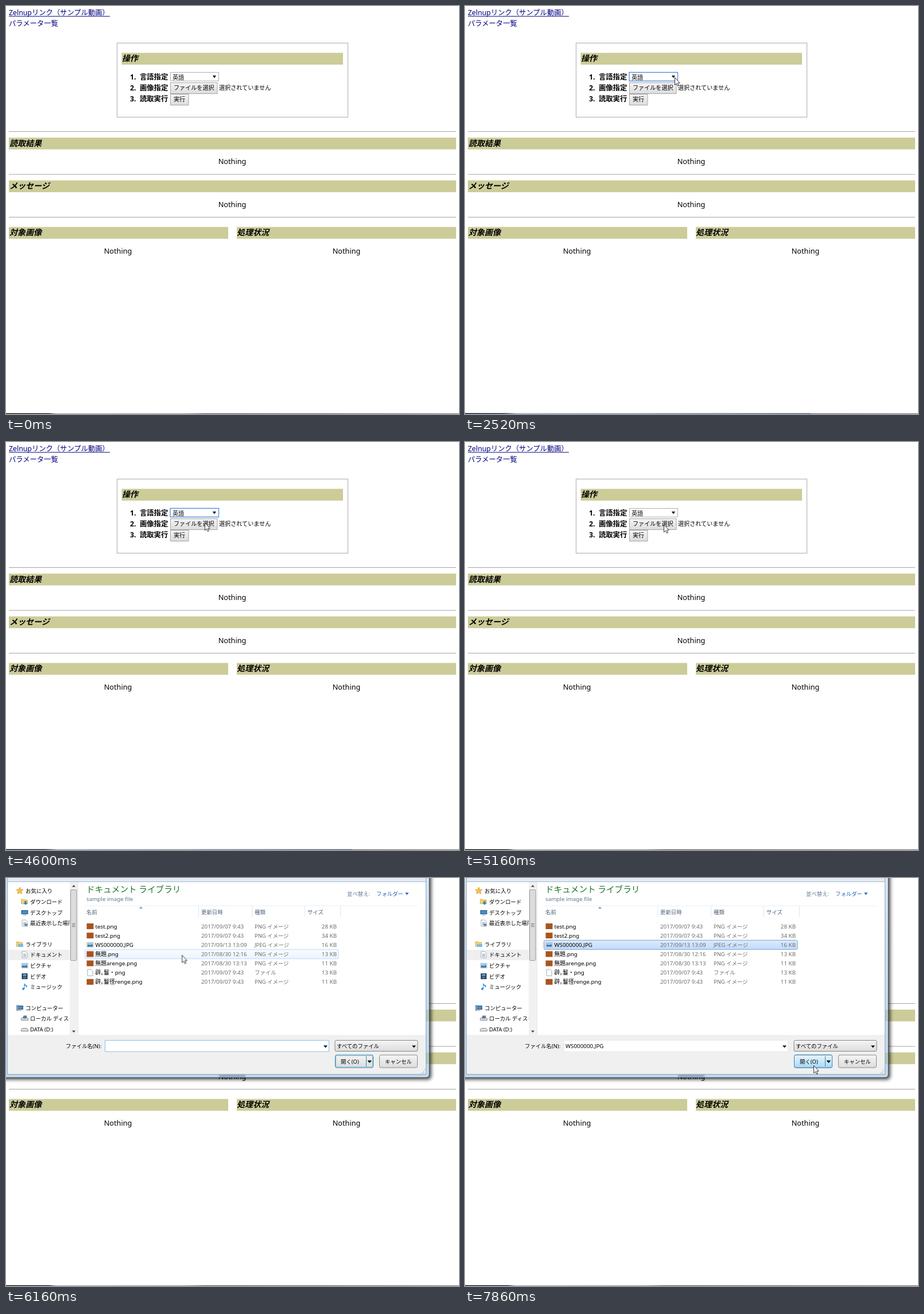
Write an HTML page that moves like this. It is 789x710 px and loops after 8 s.

```html
<!DOCTYPE html>
<html lang="ja">
<head>
<meta charset="utf-8">
<title>画像読取</title>
<style>
html, body { margin: 0; width: 100%; height: 100%; overflow: hidden; background: #fff; }
svg { display: block; width: 789px; height: 710px; }
text { font: 12.3px "Noto Sans", "Noto Sans CJK JP", sans-serif; white-space: pre; }
.nothing { font-size: 12.7px; text-anchor: middle; }
.head { font-size: 14px; font-weight: 700; font-style: italic; }
.step { font-weight: 700; }
.link { fill: #000080; }
.form { font-size: 10.1px; }
.bar { fill: #cc9; }
.rule { fill: #a3a3a3; }
.button { fill: url(#button); stroke: #a6a6a6; }
.ui text { font-size: 9.4px; }
.ui .title { font-size: 14.6px; fill: #1d7326; }
.ui .latin { font-size: 9.8px; }
.ui .soft { fill: #6d6d6d; }
.ui .label { fill: #4c607a; }
.ui .end { text-anchor: end; }

/* Everything shares one 8 s clock. */
.t { animation: 8s step-end infinite; }
.move { animation-name: move; animation-timing-function: linear; }
.hovered { animation-name: hovered; }
.focused { animation-name: focused; }
.list { animation-name: list; }
.tint { animation-name: focused; }
.dialog { animation-name: dialog; }
.caret { animation-name: caret; }
.row-hover { animation-name: row-hover; }
.picked { animation-name: picked; }
.field { animation-name: field; }
.open-hover { animation-name: open-hover; }

@keyframes move {
  0% { transform: translate(741px, 126px); opacity: 0; animation-timing-function: step-end; }
  12% { transform: translate(741px, 126px); opacity: 1; }
  16% { transform: translate(565px, 117px); }
  20.625% { transform: translate(421px, 112px); }
  21.75%, 22% { transform: translate(402px, 112px); }
  27.75%, 41.5% { transform: translate(365px, 124px); }
  46%, 56% { transform: translate(346px, 136px); }
  58.625%, 74.2% { transform: translate(346px, 143.5px); }
  82.75%, 90.8% { transform: translate(225px, 114px); animation-timing-function: ease-in-out; }
  98.25%, 100% { transform: translate(607px, 326px); opacity: 1; }
}
@keyframes hovered { 0% { opacity: 0; } 27% { opacity: 1; } 31.5%, 100% { opacity: 0; } }
@keyframes focused { 0% { opacity: 0; } 31.5% { opacity: 1; } 62.375%, 100% { opacity: 0; } }
@keyframes list { 0% { opacity: 0; } 32.5% { opacity: 1; } 51.75%, 100% { opacity: 0; } }
@keyframes dialog { 0% { opacity: 0; } 66.375%, 100% { opacity: 1; } }
@keyframes caret { 0% { opacity: 1; } 71.25% { opacity: 0; } 77.9% { opacity: 1; } 84.625%, 100% { opacity: 0; } }
@keyframes row-hover {
  0% { transform: translateY(64.5px); opacity: 1; }
  76% { transform: translateY(48.4px); }
  80% { transform: translateY(32.3px); }
  84.625% { opacity: 0; }
  92.9% { transform: translateY(48.4px); opacity: 1; }
  93.8% { transform: translateY(80.6px); opacity: 1; }
  94.6%, 100% { transform: translateY(80.6px); opacity: 0; }
}
@keyframes picked { 0% { opacity: 0; } 84.625%, 100% { opacity: 1; } }
@keyframes field { 0% { stroke: #8fbfe6; } 86.5%, 100% { stroke: #e6eaee; } }
@keyframes open-hover { 0% { opacity: 0; } 97.5%, 100% { opacity: 1; } }
</style>
</head>
<body>
<svg viewBox="0 0 789 710">
  <defs>
    <linearGradient id="button" x2="0" y2="1"><stop stop-color="#f5f5f5"/><stop offset="1" stop-color="#dcdcdc"/></linearGradient>
    <linearGradient id="hover" x2="0" y2="1"><stop stop-color="#fafcff"/><stop offset="1" stop-color="#ecf4fd"/></linearGradient>
    <linearGradient id="picked" x2="0" y2="1"><stop stop-color="#dcebfc"/><stop offset="1" stop-color="#c1dbfc"/></linearGradient>
    <linearGradient id="openHover" x2="0" y2="1"><stop stop-color="#e8f5fc"/><stop offset=".5" stop-color="#c9e8fa"/><stop offset="1" stop-color="#a5d8f3"/></linearGradient>
    <linearGradient id="glass" x2="0" y2="1"><stop stop-color="#d9e6f4"/><stop offset=".3" stop-color="#cbdff2"/><stop offset="1" stop-color="#bdd5ec"/></linearGradient>
    <linearGradient id="strip"><stop stop-color="#000"/><stop offset=".095" stop-color="#111"/><stop offset=".11" stop-color="#aaa"/><stop offset=".4" stop-color="#999"/><stop offset=".44" stop-color="#646068"/><stop offset="1" stop-color="#8a868c"/></linearGradient>
    <linearGradient id="stripTint"><stop stop-color="#0b1626"/><stop offset=".11" stop-color="#18263a"/><stop offset=".15" stop-color="#9ab"/><stop offset=".5" stop-color="#8894a2"/><stop offset="1" stop-color="#536170"/></linearGradient>
    <clipPath id="side"><path d="M3 7h108v266H3z"/></clipPath>
    <filter id="soft"><feGaussianBlur stdDeviation="1.5"/></filter>
  </defs>

  <text class="link" x="5" y="16.4">Zelnupリンク（サンプル動画）</text>
  <path class="link" d="M5 17.5h176v1H5z"/>
  <text class="link" x="5" y="34.6">パラメータ一覧</text>

  <path d="M193.5 64.5h402v129h-402z" fill="none" stroke="#c2c2c2" stroke-width="1.5"/>
  <path class="bar" d="M201.500 81.500H587V102H201.500zM5 229h779v20.500H5zM5 303.500h779V324H5zM5 384.500h382V405H5zM402 384.500h382V405H402z"/>
  <path class="rule" d="M5 218h779v1H5zM5 292.500h779v1H5zM5 367h779v1H5z"/>
  <g id="page"></g>

  <path d="M286.500 115.500h84v15h-84z" fill="#fff" stroke="#b0b0b0"/>
  <path class="t hovered" d="M286.500 115.500h84v15h-84z" fill="#f8f8f8" stroke="#8c8c8c"/>
  <path class="t focused" d="M286 115.500h84.500v15H286z" fill="#fff" stroke="#5b93dd" stroke-width="1.4"/>
  <text class="form" x="290" y="127.600">英語</text>
  <path d="M360 121h6l-3 4.500z"/>
  <rect class="button" x="286.500" y="133.500" width="81.500" height="19"/>
  <text class="form" x="292" y="146.300">ファイルを選択</text>
  <text class="form" x="371" y="146.300">選択されていません</text>
  <rect class="button" x="286.500" y="153.500" width="31.500" height="19"/>
  <text class="form" x="292" y="166.300">実行</text>

  <g class="t list">
    <path d="M286.500 131.500h84v32.500h-84z" fill="#fff" stroke="#8bb4e8"/>
    <path d="M287 131.500h83V148h-83z" fill="#1e90ff"/>
    <text class="form" x="290" y="143.200" fill="#fff">英語</text>
    <text class="form" x="290" y="159.200">日本語(精度悪)</text>
  </g>

  <path d="M0 708.800h789V710H0z" fill="url(#strip)"/>
  <path class="t tint" d="M0 708.800h602V710H0z" fill="url(#stripTint)"/>

  <g class="t dialog ui">
    <path d="M-9-9H737V342q0 5-5 5H-9z" fill="url(#glass)" stroke="#34485c" style="filter:drop-shadow(3px 3px 3px rgba(0,0,0,.75))"/>
    <path d="M736 0V341q0 5-5 5H0" fill="none" stroke="#eaf4fd" stroke-opacity=".8"/>
    <path d="M732 229h4v20h-4zM732 304h4v20h-4z" fill="#9fb39a" opacity=".5"/>
    <path d="M371 343h46v3h-46z" fill="#54708c" opacity=".7" filter="url(#soft)"/>
    <path d="M2.500-1H731.500V341.500H2.500z" fill="#fff" stroke="#93a9bf"/>
    <path d="M3 0H731V6H3z" fill="#e1ebf6"/>
    <path d="M3 6H731v1H3z" fill="#a5b8cd"/>
    <path d="M3 273H731v68H3z" fill="#f0f0f0"/>
    <path d="M3 125h108v18H3z" fill="#efefef"/>
    <path d="M111 7h14v266h-14z" fill="#f1f1f1"/>
    <rect x="112.500" y="20.500" width="10.500" height="123" rx="1.500" fill="#dcdcdc" stroke="#999"/>
    <path d="M115 15.500h6l-3-3.500zM115 265.500h6l-3 3.500z" fill="#444"/>
    <path d="M115 79.500h5.500M115 82h5.500M115 84.500h5.500" stroke="#777"/>
    <path d="M125.500 7v266" stroke="#e3e9f0"/>
    <g id="places" clip-path="url(#side)"></g>

    <text class="title" x="140" y="25">ドキュメント ライブラリ</text>
    <text class="latin" x="140" y="40" fill="#62758a">sample image file</text>
    <text x="594" y="30.500" fill="#657d96">並べ替え:</text>
    <text x="645" y="30.500" fill="#2763b8">フォルダー</text>
    <path d="M695 25.500h6.500l-3.250 4z" fill="#2763b8"/>
    <path d="M137 48.500H717" stroke="#e9eff5"/>
    <path d="M335.500 49v19M428.500 49v19M520.500 49v19M582.500 49v19" stroke="#dee7f0"/>
    <path d="M232 53h6l-3-3z" fill="#5b8fb9"/>

    <rect class="t row-hover" x="137.500" y="76" width="441.500" height="16" rx="2" fill="url(#hover)" stroke="#b8d6fb"/>
    <rect class="t picked" x="137.500" y="108.300" width="441.500" height="16" rx="2" fill="url(#picked)" stroke="#7da2ce"/>
    <g id="files"></g>

    <text x="104" y="295.500">ファイル名(N):</text>
    <path class="t field" d="M172.500 282.500h390v19.500h-390z" fill="#fff"/>
    <path d="M553 291.500h7l-3.500 4z"/>
    <path class="t caret" d="M175 285h1v14h-1z"/>
    <text class="t picked latin" x="175" y="295.500">WS000000.JPG</text>
    <rect x="573" y="282.500" width="144" height="19" rx="2" fill="url(#button)" stroke="#858585"/>
    <text x="576" y="295.500">すべてのファイル</text>
    <path d="M707 291.500h7l-3.500 4z"/>

    <rect x="573.500" y="308" width="66" height="22" rx="2.500" fill="url(#button)" stroke="#39799a"/>
    <rect x="574.700" y="309.200" width="63.600" height="19.600" rx="1.500" fill="none" stroke="#76cdf0"/>
    <rect class="t open-hover" x="573.500" y="308" width="66" height="22" rx="2.500" fill="url(#openHover)" stroke="#3c7fb1"/>
    <path d="M627.500 310v18" stroke="#48819f"/>
    <path d="M629.500 317.500h7.500l-3.750 4.500z"/>
    <text x="583" y="322.500">開く(O)</text>
    <rect x="650.500" y="308" width="66" height="22" rx="2.500" fill="url(#button)" stroke="#8a8a8a"/>
    <text x="660" y="322.500">キャンセル</text>
    <path d="M724 339h6M727 336h3M729 333h1" stroke="#bbb" stroke-width="2" stroke-dasharray="1.500 1.500"/>
  </g>

  <path class="t move" d="M.5.5V13.500L3.400 10.800 5.300 15.200 7.400 14.300 5.500 10H9.300Z" fill="#fff" stroke="#222" stroke-width=".9"/>
</svg>
<script>
const fill = (id, items) => { document.getElementById(id).innerHTML = items.join(''); };
const text = (x, y, words, kind = '') => `<text x="${x}" y="${y}" class="${kind}">${words}</text>`;
const shape = (d, color, more = '') => `<path d="${d}" fill="${color}" ${more}/>`;

fill('page', [
  ...[[202, 96.4, '操作'], [6, 243.6, '読取結果'], [6, 318.4, 'メッセージ'], [6, 399.3, '対象画像'], [402, 399.3, '処理状況']]
    .map(([x, y, words]) => text(x, y, words, 'head')),
  ...[[394, 275], [394, 349.7], [195, 430.5], [593, 430.5]].map(([x, y]) => text(x, y, 'Nothing', 'nothing')),
  ...['言語指定', '画像指定', '読取実行'].map((words, i) =>
    text(216, 127.7 + i * 19.2, `${i + 1}.`, 'step') + text(233, 127.7 + i * 19.2, words, 'step'))
]);

// Icons are drawn around their own centre.
const monitor = shape('M-6-4H6V3H-6z', '#3c5468') + shape('M-5-3H5V2H-5z', '#3e8ed0') + shape('M-3 4H3V5H-3z', '#8695a2');
const sheet = shape('M-4.500-5.500H2L4.500-3V5.500H-4.500z', '#fff', 'stroke="#8c9aa8" stroke-width=".8"');
const folder = shape('M-6-4H-1L0-3H5V4H-6z', '#efcf72', 'stroke="#c9a347" stroke-width=".6"');
const picture = shape('M-5.500-4H5.500V4H-5.500z', '#fff', 'stroke="#8fa3b5" stroke-width=".8"') +
  shape('M-4.500-3H4.500V3H-4.500z', '#8ac3e8') + shape('M-4.500 0L0 1 4.500-.5V3H-4.500z', '#35698c');
const disk = shape('M-6 0L-4-2H4L6 0V3H-6z', '#d8dce0', 'stroke="#6b747d" stroke-width=".8"');
const lines = shape('M-2.500-1H2.500M-2.500 1H2.500M-2.500 3H2.500', 'none', 'stroke="#5685ab" stroke-width=".8"');
const icons = {
  star: shape('M0-6L1.800-2 6-1.600 2.900 1.300 3.800 5.500 0 3.300-3.800 5.500-2.900 1.300-6-1.600-1.800-2z', '#f9c440', 'stroke="#d6922b" stroke-width=".8"'),
  down: folder + shape('M0-1H3V2H5L1.500 6-2 2H0z', '#2d83cf'),
  monitor,
  recent: sheet + lines + shape('M0 1H5V5H0z', '#70879b'),
  library: folder + shape('M-3 0H6V5H-3z', '#7dbbe2'),
  sheet: sheet + lines,
  picture,
  video: shape('M-5-5H5V5H-5z', '#29323d') + shape('M-3-4H3V0H-3z', '#4a9fd8') + shape('M-3 1H3V4H-3z', '#367bb0'),
  note: shape('M-1-6Q1-3 4-2 5 0 3 2 3-1 0-2V3Q0 6-3 6-5 5-4 3-3 1-1 2z', '#2f90dc'),
  computer: monitor + shape('M-6-5H-3V5H-6z', '#8899a8'),
  local: disk + shape('M-2-5H4L3 0H-3z', '#577a9a'),
  disk,
  image: shape('M-6-5H6V5H-6z', '#a9541f'),
  blank: sheet
};
const icon = (name, x, y) => `<g transform="translate(${x} ${y})">${icons[name]}</g>`;

const places = [
  [22, 'star', 'お気に入り', true], [41, 'down', 'ダウンロード'], [60, 'monitor', 'デスクトップ'],
  [78.500, 'recent', '最近表示した場所'], [115, 'library', 'ライブラリ', true], [133.500, 'sheet', 'ドキュメント'],
  [152.500, 'picture', 'ピクチャ'], [171, 'video', 'ビデオ'], [189, 'note', 'ミュージック'],
  [226, 'computer', 'コンピューター', true], [244.500, 'local', 'ローカル ディスク'], [263.500, 'disk', 'DATA (D:)']
];
fill('places', places.map(([y, name, words, top]) =>
  icon(name, top ? 24 : 32.500, y) + text(top ? 34 : 42, y + 3.600, words)));

const png = 'PNG イメージ';
const files = [
  ['image', 'test.png', '2017/09/07 9:43', png, 28],
  ['image', 'test2.png', '2017/09/07 9:43', png, 34],
  ['picture', 'WS000000.JPG', '2017/09/13 13:09', 'JPEG イメージ', 16],
  ['image', '無題.png', '2017/08/30 12:16', png, 13],
  ['image', '無題arenge.png', '2017/08/30 13:13', png, 11],
  ['blank', '辟｡鬘・png', '2017/09/07 9:43', 'ファイル', 13],
  ['image', '辟｡鬘径renge.png', '2017/09/07 9:43', png, 11]
];
const columns = [[140, '名前'], [340, '更新日時'], [433, '種類'], [525, 'サイズ']];
fill('files', [
  ...columns.map(([x, words]) => text(x, 63, words, 'label')),
  ...files.map(([kind, name, date, type, size], i) => {
    const y = 84 + i * 16.13, base = y + 3.500;
    return icon(kind, 146.500, y) + text(155.500, base, name, 'latin') + text(340, base, date, 'latin soft') +
      text(433, base, type, 'soft') + text(576, base, `${size} KB`, 'latin soft end');
  })
]);
</script>
</body>
</html>
```
